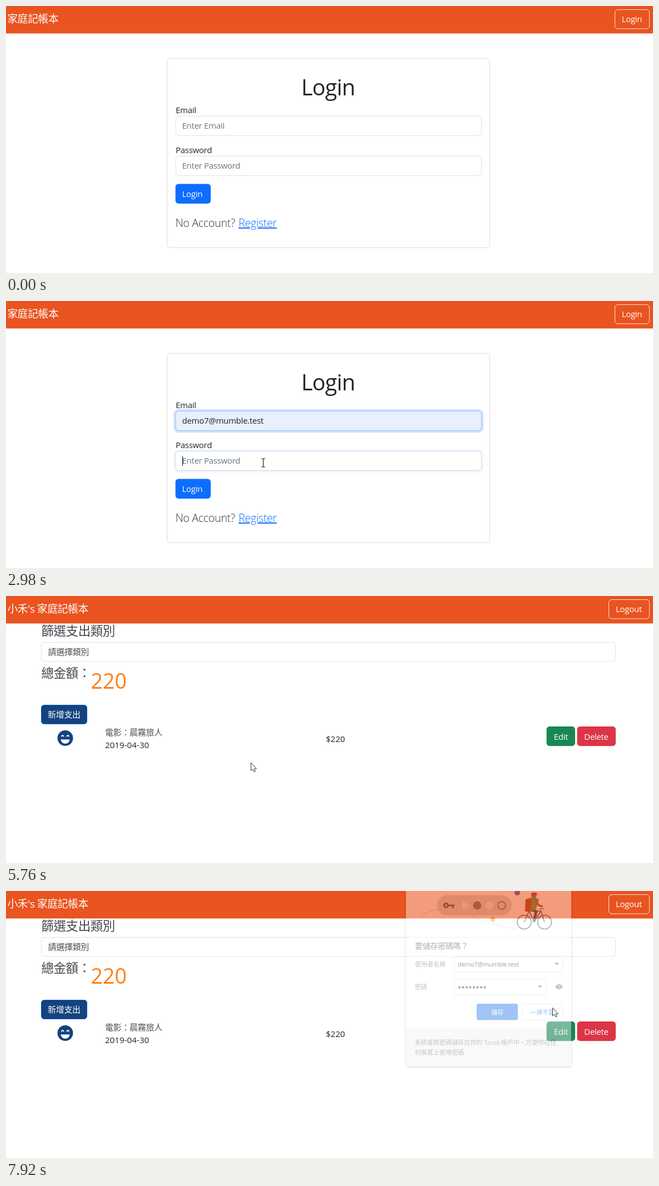
Recreate the animation shown at these times as an HTML page. Size 1163x481 px, loop 7.99 s.

```html
<!DOCTYPE html>
<html lang="zh-Hant">
<head>
<meta charset="utf-8">
<title>家庭記帳本</title>
<style>
html, body { margin: 0; width: 100%; height: 100%; overflow: hidden; background: #fff; }
svg { display: block; width: 1163px; height: 481px; }
text { font-family: "Open Sans", "Noto Sans CJK TC", "Noto Sans CJK", sans-serif; font-size: 15px; letter-spacing: -.02em; fill: #212529; white-space: pre; }
.brand { font-size: 18.75px; }
.h { font-size: 22.5px; font-weight: 300; fill: #43484d; }
.light { font-size: 19.8px; font-weight: 300; fill: #32373b; }
.soft { fill: #4a4f54; }
.num { letter-spacing: 0; }
.mid { text-anchor: middle; }
.w { fill: #fff; }
.hint { fill: #6c757d; }
.menu text { font-size: 12.5px; fill: #333; }
.preview { font: 13.33px "Liberation Sans", Arial, sans-serif; letter-spacing: 0; fill: #111; }
.title { font-size: 14px; fill: #44474a; }
.small { font-size: 11.25px; fill: #74787d; }
.small.w { fill: #fff; }
.small.blue { fill: #1a73e8; }
.small.dark { fill: #202124; }
.white { fill: #fff; }
.field { fill: #fff; stroke: #dee2e6; }
.box { fill: #fff; stroke: #dadce0; }
.focus { fill: none; stroke: #86b7fe; }
.glow { fill: none; stroke: #0d6efd; stroke-opacity: .25; stroke-width: 3.7; }
.outline { fill: none; stroke: #fff; stroke-opacity: .85; }
.caret { stroke: #111; }
.pop { filter: drop-shadow(0 1px 2px rgba(0,0,0,.4)); }
</style>
</head>
<body>
<svg viewBox="0 0 1163 481">
  <rect width="1163" height="481" fill="#fff"/>
  <rect width="1163" height="49.5" fill="#e95420"/>

  <!-- data-at: start, end, optional fade length in ms -->
  <g data-at="0 5500">
    <text class="brand w" x="2.5" y="30">家庭記帳本</text>
    <rect class="outline" x="1094.5" y="6.5" width="62" height="34.5" rx="5.5"/>
    <text class="w mid" x="1125" y="29">Login</text>
    <rect x="289.5" y="94.5" width="580" height="341" rx="5.5" fill="#fff" stroke="#dcdcdc"/>
    <text class="mid" x="579" y="161" style="font-size:39.5px">Login</text>

    <text x="305" y="193">Email</text>
    <rect class="field" x="305" y="198.5" width="549.5" height="35" rx="5.5"/>
    <rect x="305.5" y="199" width="548.5" height="34" rx="5.5" fill="#e8f0fe" data-at="2000 5500"/>
    <g data-at="1480 2950 150">
      <rect class="glow" x="303" y="196.7" width="553.5" height="38.6" rx="7.5"/>
      <rect class="focus" x="305" y="198.5" width="549.5" height="35" rx="5.5"/>
    </g>
    <text class="hint" x="316.5" y="221" data-at="0 2000">Enter Email</text>
    <text class="preview" x="316" y="221" data-at="2000 2310">milo@vorne.test</text>
    <text class="preview" x="316" y="221" data-at="2310 2500">demo7@mumble.test</text>
    <text x="316.5" y="221" data-at="2500 5500">demo7@mumble.test</text>
    <path class="caret" d="M317.5 207v18" data-at="1480 2500"/>
    <path class="caret" d="M464.5 207v18" data-at="2500 2950"/>

    <text x="305" y="265">Password</text>
    <rect class="field" x="305" y="270.5" width="549.5" height="35" rx="5.5"/>
    <g data-at="2950 5080 150">
      <rect class="glow" x="303" y="268.7" width="553.5" height="38.6" rx="7.5"/>
      <rect class="focus" x="305" y="270.5" width="549.5" height="35" rx="5.5"/>
    </g>
    <text class="hint" x="316.5" y="293" data-at="0 3440">Enter Password</text>
    <g id="dots" fill="#212529"></g>
    <path id="caret" class="caret" d="M317.5 279v18" data-at="2950 5080"/>

    <rect x="304.6" y="320.5" width="63.4" height="35.4" rx="5.5" fill="#0d6efd"/>
    <rect x="304.6" y="320.5" width="63.4" height="35.4" rx="5.5" fill="#0b5ed7" data-at="4980 5500 100"/>
    <rect x="303" y="318.7" width="66.7" height="39" rx="7.5" fill="none" stroke="#98c1fe" stroke-width="3.7" data-at="5080 5500 100"/>
    <text class="w" x="316.5" y="344">Login</text>
    <text class="light" x="304.5" y="398">No Account?</text>
    <text class="light" x="418" y="398" style="fill:#0d6efd" text-decoration="underline">Register</text>

    <g class="menu" data-at="1700 2500 130">
      <path class="pop white" d="M400 241h10l6.5-6 6.5 6h125q4 0 4 4v200q0 4-4 4H400q-4 0-4-4V245q0-4 4-4Z"/>
      <rect x="396" y="245" width="156" height="33" fill="#e8e8e8" data-at="2000 2310"/>
      <rect x="396" y="278" width="156" height="33" fill="#e8e8e8" data-at="2310 2650"/>
      <text x="407" y="265">milo@vorne.test</text>
      <text x="407" y="298">demo7@mumble.test</text>
      <text x="407" y="331.5">milo@mumble.test</text>
      <text x="407" y="365">mock@mock.mock</text>
      <text x="407" y="398">base@mumble.test</text>
      <text x="407" y="431.5">meadow</text>
    </g>
  </g>

  <g data-at="5500 7990">
    <text class="brand w" x="2.5" y="30">小禾's 家庭記帳本</text>
    <rect class="outline" x="1083.5" y="6.5" width="73" height="34.5" rx="5.5"/>
    <text class="w mid" x="1119.5" y="29">Logout</text>
    <text class="h" x="63.5" y="70.5">篩選支出類別</text>
    <rect class="field" x="63.5" y="83.5" width="1032" height="34.5" rx="5.5"/>
    <text class="soft" x="75.5" y="106">請選擇類別</text>
    <text class="h" x="63.5" y="147">總金額：</text>
    <text class="num" x="152.5" y="167" style="font-size:37.5px;fill:#fd7e14">220</text>
    <rect x="63.5" y="196.5" width="82" height="34" rx="5" fill="#15437f" stroke="#0a58ca"/>
    <text class="w" x="75" y="219">新增支出</text>
    <circle cx="106.5" cy="256" r="14" fill="#15437f"/>
    <path d="M98.5 258.5h16a8 7.5 0 0 1-16 0Z" fill="#fff"/>
    <path d="M99.5 253.5q2.2-5 4.4 0M109 253.5q2.2-5 4.4 0" fill="none" stroke="#fff" stroke-width="1.8"/>
    <text class="soft" x="178" y="251">電影：晨霧旅人</text>
    <text class="num" x="178" y="273.5" style="font-size:15.2px">2019-04-30</text>
    <text class="num" x="575" y="263">$220</text>
    <rect x="971.6" y="235" width="51.4" height="35.2" rx="5.5" fill="#198754"/>
    <text class="w mid" x="997.5" y="259">Edit</text>
    <rect x="1026.6" y="235" width="69.4" height="35.2" rx="5.5" fill="#dc3545"/>
    <text class="w mid" x="1061" y="259">Delete</text>
  </g>

  <g id="warn">
    <rect class="pop white" x="372.5" y="-60" width="414.5" height="288" rx="4"/>
    <rect x="372.5" y="-60" width="414.5" height="133.5" fill="#f8f9fa"/>
    <g fill="none" stroke="#e3e4e6" stroke-width="4">
      <path d="M373 29q14-7 24 1t14 9"/>
      <path d="M410 38q21 21 47 1" stroke="#bdc1c6" stroke-width="5"/>
      <path d="M608 25q2-19 20-27" stroke="#bdc1c6"/>
      <path d="M421 5v18M413 9.5l16 9M413 18.5l16-9" stroke="#dadce0" stroke-width="3"/>
    </g>
    <path d="M751 27a8 7.5 0 0 1 16 0Z" fill="#dadce0"/>
    <g fill="#f1f3f4" stroke="#dadce0">
      <path d="M539.5-5h68v56h-68M520 54.5h100"/>
      <rect x="476.5" y="-20" width="63" height="85" rx="5"/>
      <rect x="527.5" y="15.5" width="55" height="22.5" rx="2" fill="#fff"/>
    </g>
    <path d="M508.5 6L531 40.5H486Z" fill="#ea4335"/>
    <path d="M508.5 19v10M508.5 32v3" stroke="#fff" stroke-width="3"/>
    <g id="stars" fill="none" stroke="#1a73e8" stroke-width="1.9"></g>
    <path d="M572.5 21v11" stroke="#1a73e8" stroke-width="2"/>
    <text class="title" x="387.5" y="104">請檢查你的密碼</text>
    <text class="small" x="387.5" y="137.5">Quelda 發現你剛才使用的密碼因為資料侵害事件而遭到外洩。如要確保帳戶</text>
    <text class="small" x="387.5" y="156.5">安全，建議你立即變更密碼，並檢查已儲存的密碼。</text>
    <circle cx="398.5" cy="198" r="6" fill="none" stroke="#5f6368" stroke-width="1.4"/>
    <path d="M398.5 197v4.5M398.5 194v1.5" stroke="#5f6368" stroke-width="1.4"/>
    <rect x="617" y="183.5" width="73.5" height="29" rx="4" fill="#fff" stroke="#1a73e8" stroke-width="2"/>
    <rect x="618.6" y="185.1" width="70.3" height="25.8" rx="2" fill="#1a73e8"/>
    <text class="small w mid" x="653.5" y="202">檢查密碼</text>
    <rect class="box" x="698.5" y="183.5" width="73.5" height="29" rx="4"/>
    <text class="small blue mid" x="735" y="202">關閉</text>
  </g>

  <g id="save">
    <rect class="pop white" x="719" y="-60" width="297" height="376" rx="4"/>
    <path d="M719 247.5h297V312q0 4-4 4H723q-4 0-4-4Z" fill="#f1f3f4"/>
    <path d="M744 46q40-26 84-5t88 27" fill="none" stroke="#dadce0" stroke-width="1.5"/>
    <rect x="775" y="7.5" width="134" height="36.5" rx="18" fill="#d5d7da"/>
    <g fill="none" stroke="#3c4043" stroke-width="3">
      <circle cx="791" cy="26" r="3.5"/>
      <path d="M795 26h11M803 26v5"/>
      <circle cx="891" cy="26" r="7" stroke-width="1.5"/>
    </g>
    <path d="M820 18.5l14 7.5-14 7.5ZM869 17l8.5 9-8.5 9-8.5-9Z" fill="#f1f3f4"/>
    <circle cx="847" cy="26" r="7.5" fill="#5f6368"/>
    <path d="M873 46l7 3-3 7-7-3Z" fill="#f29900"/>
    <circle cx="919" cy="3" r="5" fill="#3949ab"/>
    <g fill="none" stroke="#3c4043" stroke-width="1.7">
      <circle cx="931.5" cy="56" r="12.5"/>
      <circle cx="968" cy="56" r="12.5"/>
      <path d="M931.5 56l9-20h21l6.500 20M940.5 36l9 20 12-20M959 32h7"/>
    </g>
    <path d="M943 33l10 4-4 18" fill="none" stroke="#202b4d" stroke-width="5"/>
    <path d="M936 18q5-8 14-7l8 4-6 20h-12Z" fill="#388e3c"/>
    <path d="M934 15q9-4 11 4l-3 18h-9Z" fill="#a52714"/>
    <path d="M952 18l6 8 7 2" fill="none" stroke="#a52714" stroke-width="3"/>
    <circle cx="949" cy="8" r="4.5" fill="#7b4a35"/>
    <path d="M943 7q3-7 11-3l1 3Z" fill="#b31412"/>

    <text class="title" x="735" y="104">要儲存密碼嗎？</text>
    <text class="small" x="735" y="136">使用者名稱</text>
    <rect class="box" x="805.5" y="118" width="195.5" height="28.5" rx="3"/>
    <text class="small dark" x="812" y="136">demo7@mumble.test</text>
    <text class="small" x="735" y="177">密碼</text>
    <rect class="box" x="805.5" y="158.5" width="165.5" height="28.5" rx="3"/>
    <g id="saved" fill="#202124"></g>
    <path d="M986 129.5h8l-4 4ZM956 170.5h8l-4 4Z" fill="#5f6368"/>
    <path d="M987 172.5q7-9 14 0q-7 9-14 0Z" fill="#5f6368"/>
    <circle cx="994" cy="172.5" r="2.3" fill="#5f6368" stroke="#fff"/>
    <rect x="846" y="203" width="74" height="29.5" rx="4" fill="#1a73e8"/>
    <text class="small w mid" x="883" y="222.5">儲存</text>
    <rect class="box" x="927.5" y="203.5" width="73.5" height="29" rx="4"/>
    <text class="small blue mid" x="964" y="222.5">一律不要</text>
    <text class="small" x="735" y="277">系統會將密碼儲存在你的 Tavoli 帳戶中，方便你在任</text>
    <text class="small" x="735" y="295">何裝置上使用密碼</text>
  </g>

  <g id="cursor" stroke-linejoin="round">
    <path id="arrow" d="M.5 .5V15L3.9 12 6.2 17 8.5 16 6.3 11.2H10.5Z" fill="#fff" stroke="#333"/>
    <path id="beam" d="M-3.5-7.500h3l.5 1 .5-1h3M-3.5 7.5h3l.5-1 .5 1h3M0-7V7" fill="none" stroke="#222" stroke-width="1.2"/>
    <path id="hand" d="M-1.5 1.5q1.5-2.5 3 0V7l6 1.5q2 .5 2 2.5l-1 5-1.5 3H0L-5 12q0-2 2-1.5l1.5 1.5Z" fill="#fff" stroke="#333"/>
  </g>
</svg>
<script>
const LOOP = 7990;
const typed = [3440, 3530, 3620, 3820, 4020, 4220, 4420, 4610];
const path = [
  [330, 1098, 478], [700, 770, 350], [1070, 519, 261], [1450, 470, 217], [1880, 470, 217],
  [2050, 452, 258], [2240, 451, 278], [2360, 452, 290], [2620, 452, 290], [2850, 462.5, 291.5],
  [4610, 462.5, 291.5], [5050, 340, 332], [5600, 340, 332], [6100, 650, 232], [6290, 664, 223],
  [6520, 735, 196], [6680, 735, 196], [6900, 985, 262], [7040, 965, 199], [7250, 965, 207],
  [7700, 982, 210], [LOOP, 982, 210]
];
const $ = id => document.getElementById(id);
const clamp = v => Math.max(0, Math.min(1, v));
const ramp = (t, from, length) => clamp((t - from) / length);
const within = (t, from, to) => t >= from && t < to;

function add(parent, tag, attrs) {
  const el = document.createElementNS("http://www.w3.org/2000/svg", tag);
  for (const name in attrs) el.setAttribute(name, attrs[name]);
  $(parent).append(el);
}

typed.forEach((time, i) => {
  add("dots", "circle", { cx: 319.7 + i * 6.4, cy: 289, r: 2.1, "data-at": `${time} 5500` });
  add("saved", "circle", { cx: 815 + i * 6.5, cy: 173.5, r: 1.9 });
});
for (const x of [535, 548, 561]) {
  add("stars", "path", { d: `M${x} 21.5v10M${x - 4.5} 24l9 5M${x - 4.5} 29l9-5` });
}

const timed = [...document.querySelectorAll("[data-at]")].map(el => {
  const [from, to, fade = 0] = el.dataset.at.split(" ").map(Number);
  return { el, from, to, fade };
});

function popup(el, opacity, scale, x) {
  el.style.opacity = opacity;
  el.style.display = opacity ? "" : "none";
  el.setAttribute("transform", `translate(${x} -60) scale(${scale}) translate(${-x} 60)`);
}

function moveCursor(t) {
  const next = path.findIndex(p => p[0] > t);
  $("cursor").style.display = next > 0 ? "" : "none";
  if (next < 1) return;
  const [t0, x0, y0] = path[next - 1], [t1, x1, y1] = path[next];
  const k = (t - t0) / (t1 - t0);
  const at = (a, b) => a + (b - a) * k;
  $("cursor").setAttribute("transform", `translate(${at(x0, x1)} ${at(y0, y1)})`);
  const kind = within(t, 1330, 1960) || within(t, 2700, 4760) ? "beam"
    : within(t, 4980, 5500) ? "hand" : "arrow";
  for (const id of ["arrow", "beam", "hand"]) $(id).style.display = id === kind ? "" : "none";
}

function render(t) {
  for (const { el, from, to, fade } of timed) {
    el.style.opacity = fade ? ramp(t, from, fade) * (1 - ramp(t, to, fade)) : +within(t, from, to);
  }
  const count = typed.filter(time => t >= time).length;
  $("caret").setAttribute("transform", `translate(${count * 6.4} 0)`);

  const warnIn = ramp(t, 5880, 190);
  popup($("warn"), warnIn * (1 - ramp(t, 6640, 140)), .945 + .055 * warnIn, 580);
  const saveIn = ramp(t, 6935, 185);
  popup($("save"), saveIn * (1 - ramp(t, 7845, 130)), .945 + .055 * saveIn, 719);
  moveCursor(t);
}

const start = performance.now();
function tick() {
  render((performance.now() - start) % LOOP);
  requestAnimationFrame(tick);
}
tick();
</script>
</body>
</html>
```
